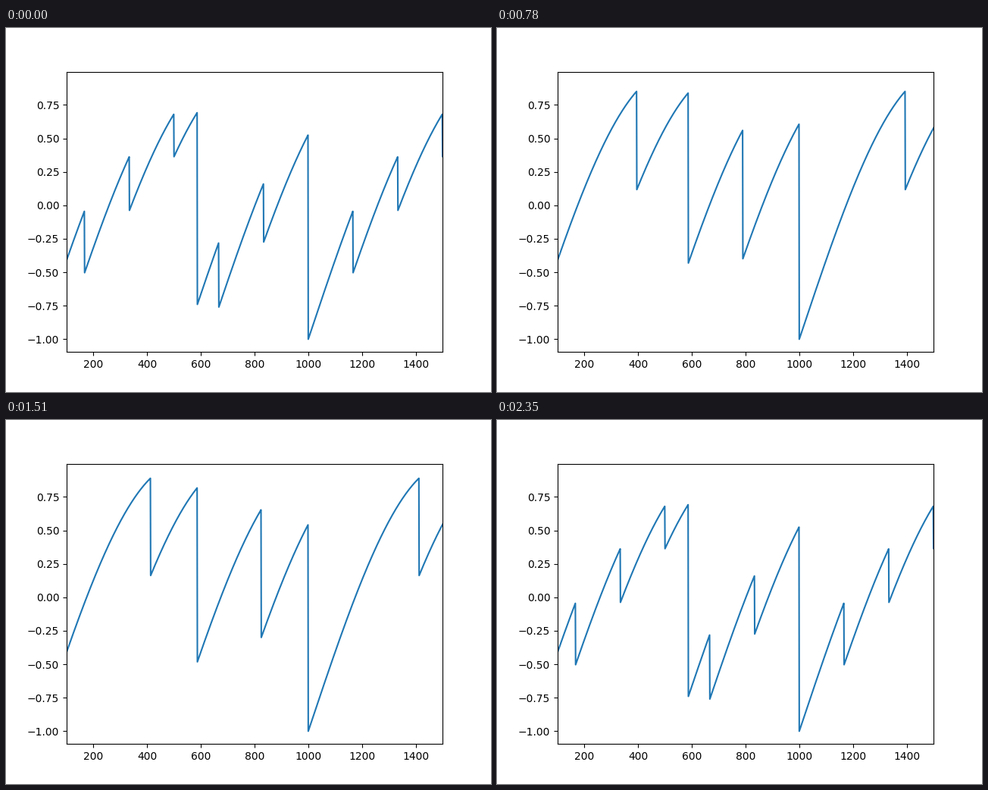
Animation, 640 px wide and 480 px high, one loop 2.41 s. Source, as a matplotlib script:

```python
import numpy as np
import matplotlib.pyplot as plt
from matplotlib.animation import FuncAnimation

TICK_MS = 10
TICKS = 241          # one loop of 2410 ms
TICKS_PER_STEP = 6   # the curve holds for 60 ms

CYCLE = 1000         # both ramps restart here
FIXED_PERIOD = 587
PERIODS = np.linspace(CYCLE / 6, CYCLE / 2, 20)

x = np.arange(0, 2001)


def wave(period):
    """Sine of two summed ramps, both restarted every cycle."""
    phase = x % CYCLE
    ramps = phase % period + phase % FIXED_PERIOD
    return 2 * np.sin(0.0015 * ramps) - 1


fig, ax = plt.subplots(figsize=(6.4, 4.8), dpi=100)
# The vertical range is fitted to the middle period and then kept.
line, = ax.plot(x, wave(CYCLE / 3), lw=1.5, color="#1f77b4")
ax.set_xlim(100, 1500)
ax.set_ylim(ax.get_ylim())


def update(tick):
    # The period sweeps up, then back down in mirrored order.
    step = min(tick, TICKS - 1 - tick) // TICKS_PER_STEP
    line.set_ydata(wave(PERIODS[min(step, len(PERIODS) - 1)]))
    return line,


anim = FuncAnimation(fig, update, frames=TICKS, interval=TICK_MS,
                     init_func=lambda: update(0), repeat=True,
                     repeat_delay=0, blit=False)
plt.show()
```
